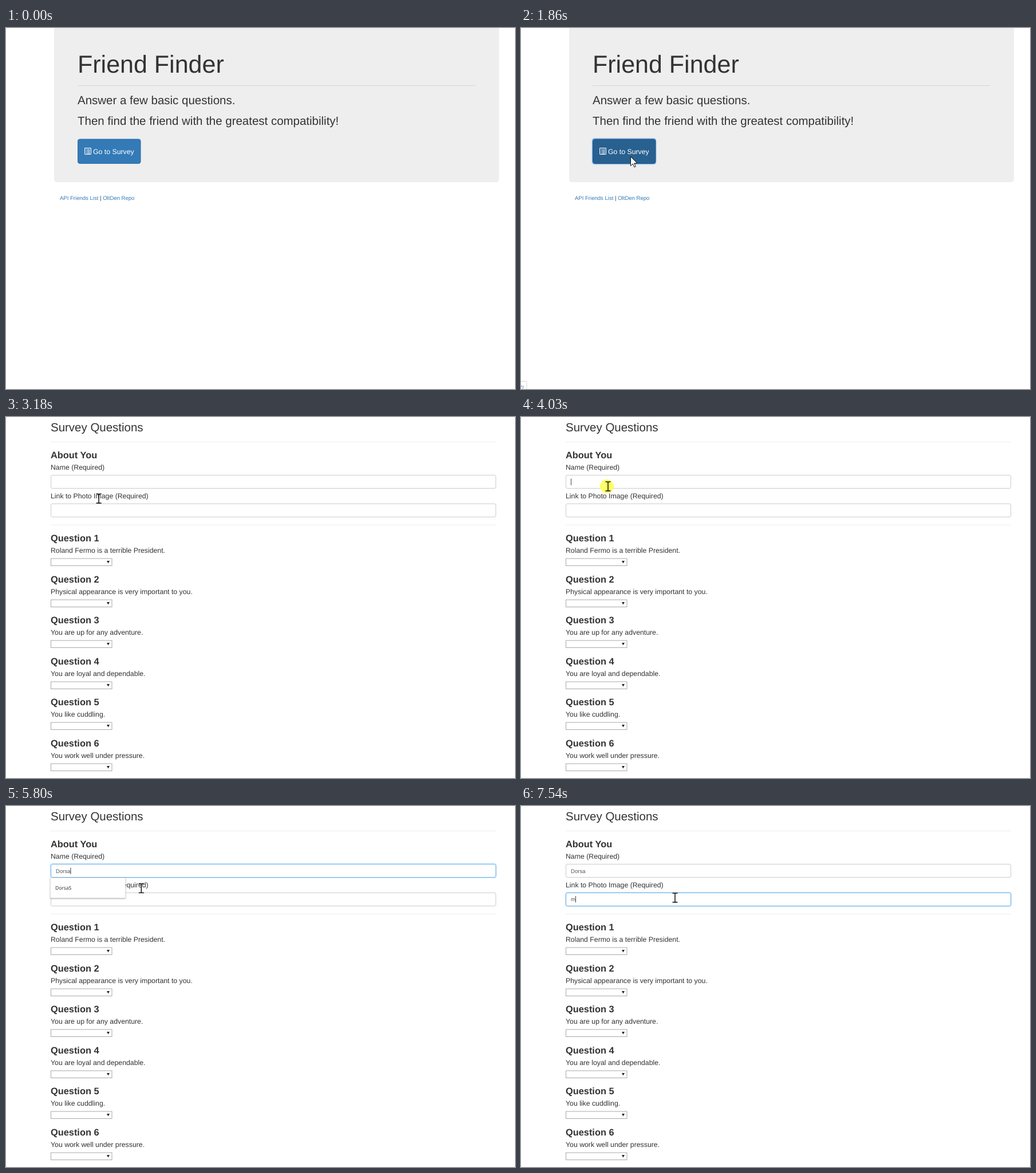
Write an HTML page that moves like this. It is 889 px wide and 630 px high and loops after 8 s.

```html
<!DOCTYPE html>
<html lang="en">
<head>
<meta charset="utf-8">
<title>Friend Finder</title>
<style>
html, body { margin: 0; height: 100%; overflow: hidden; background: #fff; }
svg { display: block; }
text { font-family: "Liberation Sans", Arial, sans-serif; fill: #333; text-rendering: geometricPrecision; white-space: pre; }
.h1 { font-size: 43px; }
.h2 { font-size: 20.48px; }
.h3 { font-size: 16.38px; font-weight: bold; }
.label { font-size: 12.29px; }
.small { font-size: 9.56px; }
.value { font-size: 9.56px; fill: #555; }
.ui { font-family: "Open Sans", "Noto Sans", sans-serif; font-size: 8.5px; fill: #222; }
.link { fill: #337ab7; }
.white { fill: #fff; }
.field { fill: #fff; stroke: #ccc; }
.select { fill: #fff; stroke: #a9a9a9; }
#popup rect { fill: #fff; stroke: #ddd; stroke-width: .5; filter: drop-shadow(0 1px 1.2px rgba(0,0,0,.35)); }
</style>
</head>
<body>
<svg width="889" height="630" viewBox="0 0 889 630">
  <g id="home">
    <path d="M84 0H861V264.500a4.500 4.500 0 0 1-4.500 4.500H88.500a4.500 4.500 0 0 1-4.500-4.500z" fill="#eee"/>
    <text class="h1" x="125" y="78">Friend Finder</text>
    <path d="M125 100.500H820" stroke="#d5d5d5"/>
    <text class="h2" x="125" y="133">Answer a few basic questions.</text>
    <text class="h2" x="125" y="169">Then find the friend with the greatest compatibility!</text>
    <rect id="halo" x="124.500" y="193" width="111" height="44.500" rx="4" fill="none" stroke="#8fbcf0" stroke-width="1.600"/>
    <rect id="button" x="125.500" y="194" width="109.500" height="42.500" rx="3.500"/>
    <g stroke="#fff" fill="none">
      <rect x="137.500" y="209.500" width="11" height="11" rx=".6"/>
      <path d="M137.500 209.700h11"/>
      <path d="M139.300 212.500h1.200m1 0h5.400M139.300 214.700h1.200m1 0h5.400M139.300 216.900h1.200m1 0h5.400M139.300 219h1.200m1 0h5.400"/>
    </g>
    <text class="label white" x="152" y="220">Go to Survey</text>
    <text class="small" x="94" y="300.300"><tspan class="link">API Friends List</tspan> | <tspan class="link">OltDen Repo</tspan></text>
  </g>
  <g id="survey">
    <text class="h2" x="78" y="25">Survey Questions</text>
    <path d="M78 43.500H856M78 188.500H856" stroke="#eee"/>
    <text class="h3" x="78" y="72">About You</text>
    <text class="label" x="78" y="92">Name (Required)</text>
    <text class="label" x="78" y="142">Link to Photo Image (Required)</text>
    <g id="questions"></g>
    <rect id="field1" class="field" x="78.500" y="101.500" width="777" height="23" rx="2.500"/>
    <rect id="field2" class="field" x="78.500" y="151.500" width="777" height="23" rx="2.500"/>
    <text id="name" class="value" x="87" y="116.500"></text>
    <text id="photo" class="value" x="87" y="166">m</text>
    <rect id="caret" width="1" height="11.500" fill="#444"/>
    <g id="popup"><rect x="77.500" y="125.500" width="131"/></g>
  </g>
  <g id="status">
    <path d="M-1 616.500H8.500a1.500 1.500 0 0 1 1.500 1.500V631H-1z" fill="#fff" stroke="#d4d4dc"/>
    <text class="ui" x="5.500" y="628" text-anchor="end" style="fill:#7c84a8;font-size:8px">ey</text>
  </g>
  <circle id="click" r="12" fill="#ffff66"/>
  <path id="arrow" d="M.5 .5V16.500L4.300 13 6.800 18.800 9.300 17.700 6.800 12H12z" fill="#fff" stroke="#111"/>
  <path id="beam" d="M-4.500 -8H-1.500Q0 -8 0 -6.500Q0 -8 1.500 -8H4.500M0 -7V7M-4.500 8H-1.500Q0 8 0 6.500Q0 8 1.500 8H4.500" fill="none" stroke="#111" stroke-width="1.500"/>
</svg>
<script>
const $ = id => document.getElementById(id);
const show = (id, on) => { $(id).style.display = on ? '' : 'none'; };
const place = (id, [x, y]) => $(id).setAttribute('transform', `translate(${x} ${y})`);

$('questions').innerHTML = [
  'Roland Fermo is a terrible President.',
  'Physical appearance is very important to you.',
  'You are up for any adventure.',
  'You are loyal and dependable.',
  'You like cuddling.',
  'You work well under pressure.'
].map((q, i) => {
  const y = Math.round(i * 71.5);
  return `<g transform="translate(78 ${y})">
    <text class="h3" y="217">Question ${i + 1}</text>
    <text class="label" y="237">${q}</text>
    <rect class="select" x=".5" y="247" width="106.500" height="12.500"/>
    <path d="M98 251h5l-2.500 4.500z" fill="#222"/></g>`;
}).join('');

['DorsaS', 'Milo', 'Anneke', 'Tobin', 'Jorah', 'Selma'].forEach((s, i) => {
  $('popup').innerHTML += `<text class="ui" x="86" y="${146 + i * 25.4}">${s}</text>`;
});
const [popupBox, ...rows] = $('popup').children;

// Pointer glides: start, duration, steps, from, to, easing power
const glides = [
  [920, 640, 9, [822, 631], [191, 224], 2],
  [2870, 620, 9, [191, 224], [155, 122], 2],
  [3640, 1, 1, [155, 122], [152, 121], 1],
  [5650, 620, 9, [152, 121], [268, 152], 3.2],
  [6440, 1, 1, [268, 152], [268.5, 159], 1],
  [6910, 1, 1, [268.5, 159], [269, 160], 1]
];

function pointer(t) {
  const g = glides.filter(g => t >= g[0]).pop();
  if (!g) return null;
  const [start, length, steps, a, b, power] = g;
  const k = Math.floor((t - start + 8) * (steps - 1) / length);
  const p = 1 - (1 - Math.min(1, (k + 1) / steps)) ** power;
  return a.map((v, i) => v + (b[i] - v) * p);
}

function glow(id, amount) {
  const mix = (a, b) => Math.round(a + (b - a) * amount);
  const s = $(id).style;
  s.stroke = `rgb(${mix(204, 102)},${mix(204, 175)},${mix(204, 233)})`;
  s.filter = amount ? `drop-shadow(0 0 1.5px rgba(102,175,233,${.6 * amount}))` : 'none';
}

const typed = [4870, 5100, 5170, 5250, 5430];
const within = (t, a, b) => t >= a && t < b;

function draw(t) {
  const home = t < 2260;
  show('home', home);
  show('survey', !home);

  const pos = pointer(t);
  const beam = pos && !home && pos[1] < 165 && t > 2870;
  show('arrow', pos && !beam);
  show('beam', beam);
  if (pos) { place('arrow', pos); place('beam', pos); }

  const hover = pos && pos[0] < 235 && pos[1] < 237;
  $('button').style.fill = hover ? '#286090' : '#337ab7';
  $('button').style.stroke = hover ? '#255a88' : '#2e6da4';
  show('halo', t >= 1860);
  show('status', within(t, 1700, 2340));
  $('status').style.opacity = t < 1860 ? .4 : 1;

  const click = within(t, 3870, 4110) || within(t, 6030, 6190) || within(t, 6590, 6670);
  show('click', click);
  if (click) place('click', [pos[0] - 2, pos[1] - (t > 6000 && t < 6300 ? 1 : 0)]);

  glow('field1', within(t, 4110, 6190) ? (t < 4180 ? .6 : 1) : 0);
  glow('field2', t >= 6590 ? (t < 6670 ? .4 : 1) : 0);

  const count = typed.filter(s => t >= s).length;
  $('name').textContent = 'Dorsa'.slice(0, count);
  show('photo', t >= 7540);
  const second = t >= 6590;
  show('caret', within(t, 3950, 4560) || within(t, 4870, 6190) || within(t, 6590, 7140) || t >= 7540);
  const width = second ? (t >= 7540 ? 8 : 0) : count && $('name').getComputedTextLength();
  place('caret', [87 + width, second ? 157 : 107.5]);

  show('popup', within(t, 4110, 6110));
  popupBox.setAttribute('height', count ? 35 : 162);
  rows.forEach((r, i) => { r.style.display = i && count ? 'none' : ''; });
}

function loop() {
  draw(performance.now() % 8000);
  requestAnimationFrame(loop);
}
loop();
</script>
</body>
</html>
```
